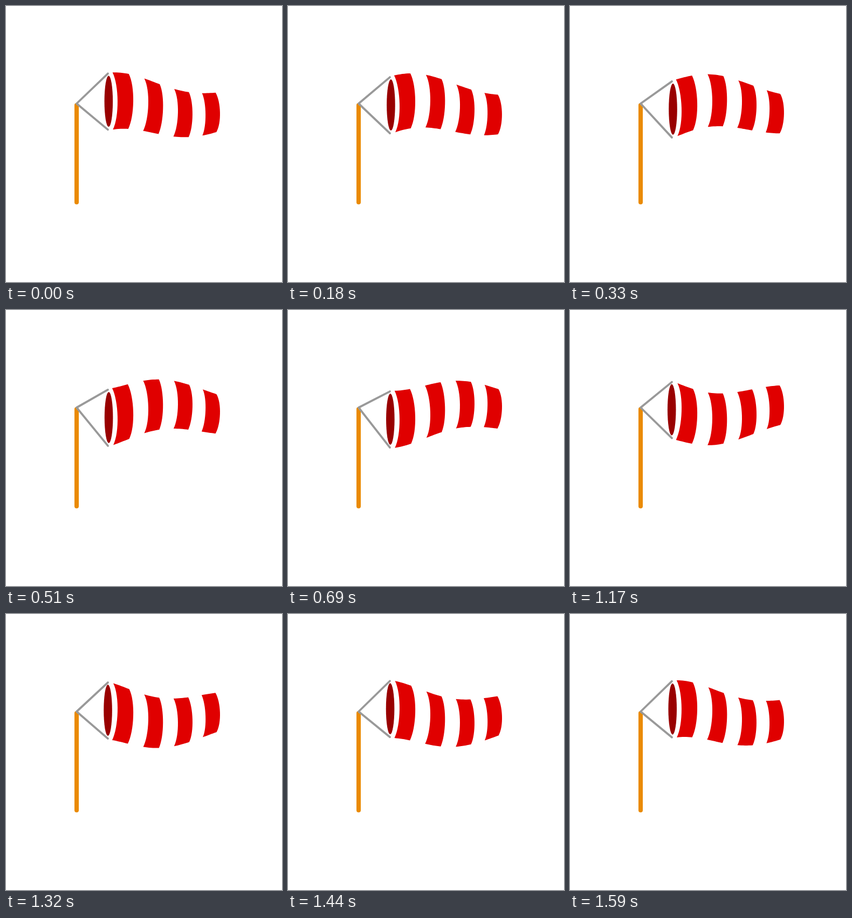
Recreate the animation shown at these times as an HTML page with a canvas. Size 512 by 512 pixels, loop 1.62 s.

```html
<!DOCTYPE html>
<html lang="en">
<head>
<meta charset="utf-8">
<title>Windsock</title>
<style>
  html, body { margin: 0; width: 100%; height: 100%; overflow: hidden; background: #fff; }
  canvas { display: block; width: 100vmin; height: 100vmin; }
</style>
</head>
<body>
<canvas id="stage" width="512" height="512"></canvas>
<script>
const ctx = document.getElementById('stage').getContext('2d');
const LOOP = 1620, STEP = 30;
const RIM = 189.5, SWING = 13.6;
const RED = '#e00000', DARK = '#990000', ORANGE = '#ea8a00', GREY = '#999999';

// Each stripe: left edge, right edge, and how far each edge bows out.
const stripes = [
  [198, 227.3, 9, 8.8],
  [255.5, 284, 8.5, 7.3],
  [311.3, 339, 7.7, 7],
  [364, 389.5, 6.2, 7.5]
];

// The wave travels from the rim to the tail, a little faster towards the end.
function delay(x) {
  const u = x - RIM;
  return 690 + 5.65 * u + 0.004 * u * (200 - u);
}

function middle(x, t) {
  const sway = Math.cos(2 * Math.PI * (t - delay(x)) / LOOP);
  return 189.5 - 0.009 * (x - RIM) + SWING * sway;
}

function slope(x, t) {
  return (middle(x + 1, t) - middle(x - 1, t)) / 2;
}

function halfHeight(x) {
  const u = x - 198;
  return 53 - 0.0848 * u + 0.0001 * u * (191 - u);
}

// side is -1 for the top of the sock and 1 for the bottom.
function corner(x, side, t) {
  const px = x - side * 4 * slope(x, t);
  return [px, middle(px, t) + side * halfHeight(px)];
}

function bow(x, bulge, from, t) {
  const [x0, y0] = corner(x, from, t);
  const [x1, y1] = corner(x, -from, t);
  const pull = bulge * 4 / 3, inset = (y1 - y0) * 0.225;
  ctx.bezierCurveTo(x0 + pull, y0 + inset, x1 + pull, y1 - inset, x1, y1);
}

function follow(x0, x1, side, t) {
  const parts = 8;
  for (let i = 1; i <= parts; i++) {
    ctx.lineTo(...corner(x0 + (x1 - x0) * i / parts, side, t));
  }
}

function drawStripe([left, right, leftBow, rightBow], t) {
  ctx.beginPath();
  ctx.moveTo(...corner(left, -1, t));
  follow(left, right, -1, t);
  bow(right, rightBow, -1, t);
  follow(right, left, 1, t);
  bow(left, leftBow, 1, t);
  ctx.fillStyle = RED;
  ctx.fill();
}

function drawLine(points, width, color) {
  ctx.beginPath();
  points.forEach(p => ctx.lineTo(...p));
  ctx.lineWidth = width;
  ctx.strokeStyle = color;
  ctx.stroke();
}

function draw(t) {
  const rimY = middle(RIM, t);
  ctx.fillStyle = '#fff';
  ctx.fillRect(0, 0, 512, 512);
  ctx.lineCap = ctx.lineJoin = 'round';

  drawLine([[131, 184], [131, 364]], 8, ORANGE);
  drawLine([[189, rimY - 52], [131, 181], [189, rimY + 52]], 3.8, GREY);

  ctx.beginPath();
  ctx.ellipse(189.8 - 3.5 * slope(RIM, t), rimY - 0.5, 7.8, 47.5, 0, 0, 2 * Math.PI);
  ctx.fillStyle = DARK;
  ctx.fill();

  stripes.forEach(stripe => drawStripe(stripe, t));
}

const start = performance.now();
function tick() {
  const elapsed = (performance.now() - start) % LOOP;
  draw(Math.floor(elapsed / STEP) * STEP);
  requestAnimationFrame(tick);
}
tick();
</script>
</body>
</html>
```
